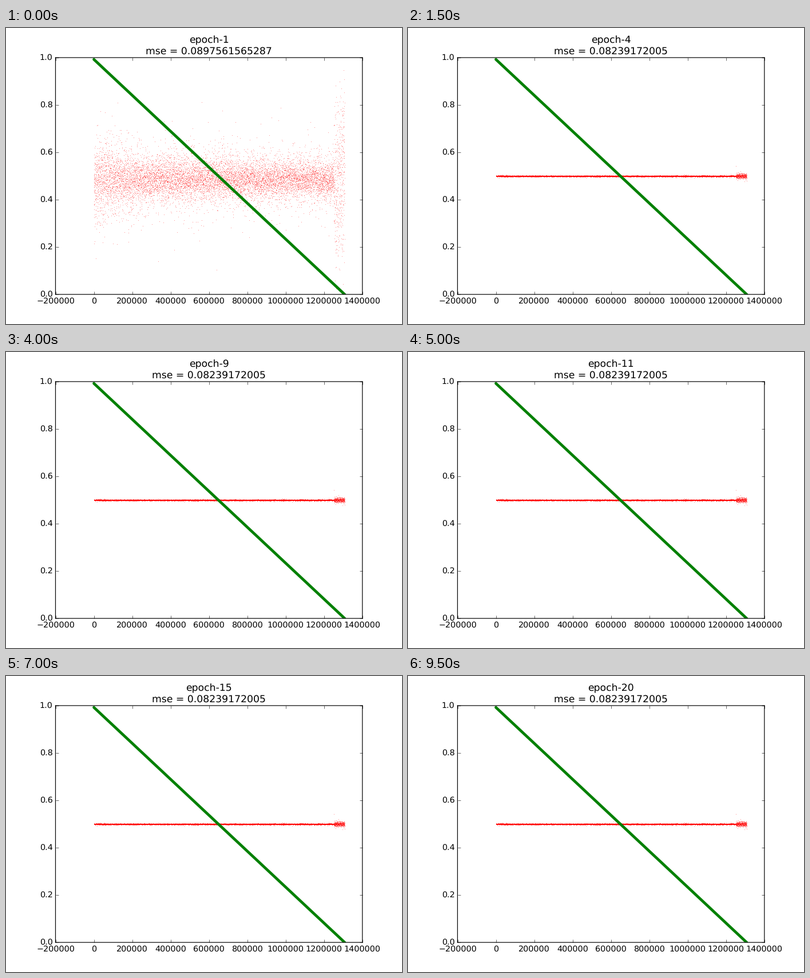
Animation, 692 px wide and 519 px high, one loop 10000 ms. Source, as a matplotlib script:

```python
import numpy as np
import matplotlib.pyplot as plt
from matplotlib.animation import FuncAnimation

WIDTH, HEIGHT, DPI = 692, 519, 86.5
EPOCHS, INTERVAL = 20, 500
SAMPLES, POINTS = 1307500, 10240
MSE = ["0.0897561565287", "0.0823917188068", "0.08239172005"]

plt.rcParams.update({
    "font.family": "DejaVu Sans",
    "font.size": 12,
    "text.hinting": "none",
    "axes.linewidth": 1.0,
    "ytick.alignment": "center",
})

rng = np.random.default_rng(7)
u = np.linspace(0, 1, POINTS)
x = u * SAMPLES
tail = u > 0.957


def noisy_start():
    """Broad band of predictions that narrows to the right, then bursts."""
    scale = 0.051 - 0.014 * u + 0.035 * np.exp(-u / 0.07)
    band = 0.485 + scale * rng.standard_t(6, POINTS)
    burst = 0.5 + 0.18 * rng.standard_normal(POINTS)
    return np.where(tail, burst, band)


def collapsed():
    """Nearly constant predictions with a small burst at the end."""
    band = 0.4972 + 0.0011 * rng.standard_t(6, POINTS)
    burst = 0.4972 + 0.006 * rng.standard_normal(POINTS)
    y = np.where(tail, burst, band)
    y[np.argmax(tail)] = 0.54
    return y


predictions = [noisy_start(), collapsed()]

fig = plt.figure(figsize=(WIDTH / DPI, HEIGHT / DPI), dpi=DPI, facecolor="white")
ax = fig.add_axes([0.125, 0.1, 0.775, 0.8])
ax.set_xlim(-200000, 1400000)
ax.set_ylim(0, 1)
ax.set_xticks(range(-200000, 1400001, 200000))
ax.set_yticks(np.linspace(0, 1, 6))
ax.ticklabel_format(style="plain", useOffset=False)
ax.tick_params(direction="in", length=4, width=0.5, pad=4, top=True, right=True)
for spine in ax.spines.values():
    spine.set_snap(False)

dots, = ax.plot(x, predictions[0], ",", color="red", alpha=0.42)
ax.plot([0, SAMPLES], [0.9925, 0], color="green", lw=4, solid_capstyle="round")


def title_line(baseline):
    return fig.text(0.5125, 1 - baseline / HEIGHT, "", ha="center",
                    va="baseline", fontsize=14.4)


epoch_text = title_line(26.5)
mse_text = title_line(45.9)


def update(i):
    dots.set_ydata(predictions[min(i, 1)])
    epoch_text.set_text(f"epoch-{i + 1}")
    mse_text.set_text(f"mse = {MSE[min(i, 2)]}")
    return dots, epoch_text, mse_text


anim = FuncAnimation(fig, update, frames=EPOCHS, interval=INTERVAL,
                     repeat=True, repeat_delay=0)
plt.show()
```
